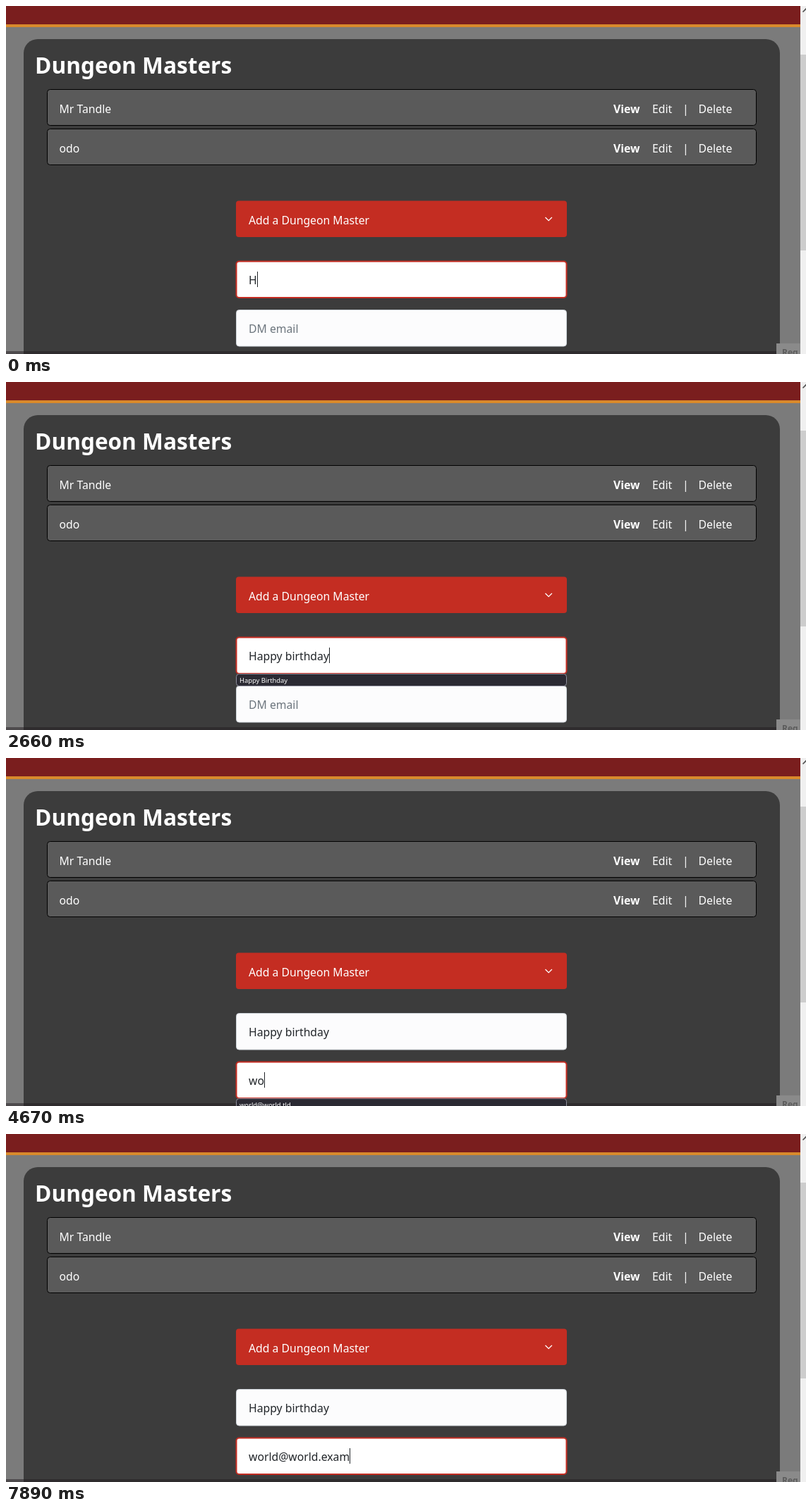
Write an HTML page that moves like this. It is 1134 by 494 pixels and loops after 8000 ms.

```html
<!DOCTYPE html>
<html lang="en">
<head>
<meta charset="utf-8">
<title>Dungeon Masters</title>
<style>
  html, body { margin: 0; width: 100%; height: 100%; overflow: hidden; background: #7b7b7b; }
  svg { display: block; width: 1134px; height: 494px; }
  text { font: 15.75px "Noto Sans", "Open Sans", sans-serif; fill: #fff; white-space: pre; }
  .title { font-size: 31.6px; font-weight: bold; }
  .bold { font-weight: bold; }
  .small { font-size: 9.4px; }
  .typed { fill: #212529; }
  .placeholder { fill: #6c757d; }
  .row { fill: #5a5a5a; stroke: #000; }
  .popup rect { fill: #2b2a33; stroke: #8f8f9d; }
  .field { fill: #fcfcfd; stroke: #ced4da; }
  .field.focus { fill: #fff; stroke: #c42d22; stroke-width: 2; }
</style>
</head>
<body>
<svg viewBox="0 0 1134 494">
  <rect width="1134" height="494" fill="#7b7b7b"/>
  <rect width="1126" height="26" fill="#7a1e1e"/>
  <rect y="26" width="1126" height="4" fill="#d98a2c"/>
  <rect x="25" y="47" width="1072" height="500" rx="20" fill="#3c3c3c"/>
  <text class="title" x="41" y="96">Dungeon Masters</text>
  <g id="rows"></g>

  <rect x="326" y="276.5" width="469" height="51.5" rx="4" fill="#c42d22"/>
  <text x="344" y="310">Add a Dungeon Master</text>
  <path d="M764.5 300l4.7 4.6 4.7-4.6" fill="none" stroke="#fff" stroke-width="1.3"/>

  <rect y="490" width="1126" height="4" fill="#231c20" opacity=".5"/>
  <rect id="nameField" x="326.5" y="362.5" width="468" height="51.5" rx="4"/>
  <rect id="emailField" x="326.5" y="431.5" width="468" height="51.5" rx="4"/>
  <text id="nameText" class="typed" x="344" y="395"></text>
  <text id="placeholder" class="placeholder" x="344" y="464">DM email</text>
  <text id="emailText" class="typed" x="344" y="464"></text>
  <rect id="caret" width="1" height="22" fill="#212529"/>

  <g id="namePopup" class="popup">
    <rect id="namePopupBox" x="326.5" y="414.5" width="468" height="17" rx="4"/>
    <text class="small" x="331" y="427">Happy Birthday</text>
    <text id="secondHint" class="small" x="331" y="445">Hello</text>
  </g>
  <g id="emailPopup" class="popup">
    <rect x="326.5" y="483.5" width="468" height="40" rx="4"/>
    <text class="small" x="331" y="495.5">world@world.tld</text>
  </g>

  <g id="pointer">
    <circle r="10" fill="#fbf873"/>
    <path d="M-4-6.5h3l1 1 1-1h3M0-5.5v12M-4 7h3l1-1 1 1h3" fill="none" stroke="#4a4a30" stroke-width="1.4"/>
  </g>

  <rect x="1126" width="8" height="494" fill="#f0f0f0"/>
  <rect x="1126" y="69" width="8" height="278" fill="#cdcdcd"/>
  <path d="M1129.5 8.5l4.5-4.5 4.5 4.5" fill="none" stroke="#505050" stroke-width="1.6"/>
  <rect x="1092" y="479" width="34" height="15" fill="#8a8a8a"/>
  <text class="bold" style="font-size:12px;fill:#5c5c5c" x="1100" y="496">Reg</text>
</svg>
<script>
const LOOP = 8000;
const el = id => document.getElementById(id);

// Times at which each successive character appears.
const nameEntry = {
  text: 'Happy birthday',
  times: [0, 270, 540, 680, 1000, 1270, 1670, 1860, 1990, 2190, 2270, 2460, 2560, 2660]
};
const emailEntry = {
  text: 'world@world.exam',
  times: [4530, 4670, 4740, 4800, 4990, 5460, 5920, 6120, 6250, 6450, 6650, 7040, 7500, 7680, 7790, 7890]
};
const CLICK = 3870;
const POINTER_IN = 3300;

el('rows').innerHTML = ['Mr Tandle', 'odo'].map((name, i) => `
  <g transform="translate(0 ${i * 56})">
    <rect class="row" x="58.5" y="118.5" width="1005" height="51" rx="4"/>
    <text x="75.5" y="152">${name}</text>
    <text class="bold" x="861" y="152">View</text>
    <text x="916" y="152">Edit</text>
    <text x="959" y="152">|</text>
    <text x="981.5" y="152">Delete</text>
  </g>`).join('');

const typedAt = (entry, t) => entry.text.slice(0, entry.times.filter(k => k <= t).length);
const show = (id, visible) => el(id).setAttribute('display', visible ? 'inline' : 'none');
const between = (t, a, b) => t >= a && t < b;

function render(t) {
  const onEmail = t >= CLICK;
  const email = typedAt(emailEntry, t);
  el('nameText').textContent = typedAt(nameEntry, t);
  el('emailText').textContent = email;
  show('placeholder', !email);
  el('nameField').setAttribute('class', onEmail ? 'field' : 'field focus');
  el('emailField').setAttribute('class', onEmail ? 'field focus' : 'field');

  const active = el(onEmail ? 'emailText' : 'nameText');
  const width = active.textContent ? active.getComputedTextLength() : 0;
  el('caret').setAttribute('x', Math.round(344 + width));
  el('caret').setAttribute('y', onEmail ? 446 : 377);
  show('caret', !between(t, 3160, 3660) && !between(t, 4400, 4530));

  const twoHints = t < 340;
  show('namePopup', between(t, 70, 3730));
  show('secondHint', twoHints);
  el('namePopupBox').setAttribute('height', twoHints ? 36 : 17);
  show('emailPopup', between(t, 4670, 7570));

  const p = Math.min(1, Math.max(0, Math.floor((t - POINTER_IN) / 70) / 7));
  const ease = 1 - (1 - p) ** 2;
  const [x, y] = onEmail ? [536, 469] : [575 - 35 * ease, 400 + 71 * ease];
  el('pointer').setAttribute('transform', `translate(${x} ${y})`);
  show('pointer', between(t, POINTER_IN, 4530));
}

function frame() {
  render(performance.now() % LOOP);
  requestAnimationFrame(frame);
}
frame();
</script>
</body>
</html>
```
